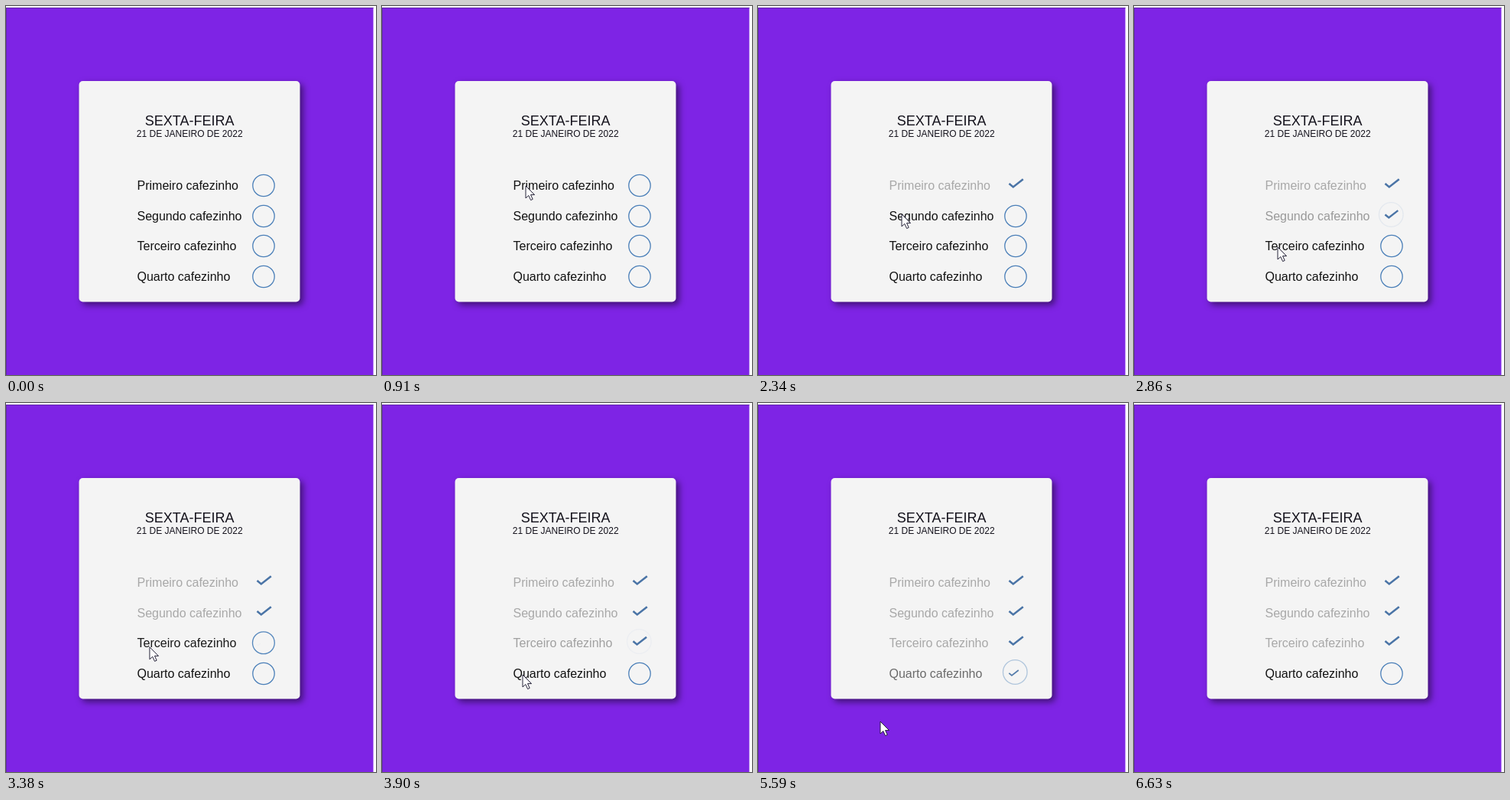
An HTML page for the animation above (6.76 s loop, 484 by 482 pixels).

```html
<!DOCTYPE html>
<html lang="pt-BR">
<head>
<meta charset="utf-8">
<title>Cafezinhos</title>
<style>
  html, body { margin: 0; width: 100%; height: 100%; overflow: hidden; background: #fff; }
  svg { display: block; width: 100vw; height: 100vh; }
  text { font-family: "Liberation Sans", Arial, sans-serif; fill: #14121c; }
  .card { fill: #f4f4f4; filter: drop-shadow(4px 4px 4px rgba(0, 0, 0, .5)); }
  .ring { fill: none; stroke: #4a7fb8; stroke-width: 1.3; }
  .tick { fill: none; stroke: #4a74a6; stroke-width: 2.6; }
</style>
</head>
<body>
<svg viewBox="0 0 484 482">
  <rect y="2" width="480.5" height="480" fill="#7e24e5"/>
  <path d="M.5 482V2.5H480.5" fill="none" stroke="#5f2aa8"/>
  <rect class="card" x="95.5" y="98" width="289" height="288.5" rx="5"/>
  <text x="240.2" y="156" font-size="18" text-anchor="middle">SEXTA-FEIRA</text>
  <text x="240.2" y="171" font-size="12" text-anchor="middle">21 DE JANEIRO DE 2022</text>
  <g id="list"></g>
  <path id="cursor" d="M0 0V16L3.8 12.5 6.6 18.6 9.2 17.4 6.5 11.6H11.6Z"
        fill="#fff" stroke="#26243a" stroke-linejoin="round"/>
</svg>
<script>
const LOOP = 6760, STEP = 130, FADE = 800;
const NS = "http://www.w3.org/2000/svg";
const list = document.getElementById("list");
const cursor = document.getElementById("cursor");

// on / off: when the item is ticked and unticked
const items = [
  { label: "Primeiro cafezinho", y: 234.5, on: 1290 },
  { label: "Segundo cafezinho", y: 274.5, on: 2360 },
  { label: "Terceiro cafezinho", y: 313.5, on: 3325 },
  { label: "Quarto cafezinho", y: 353.5, on: 4350, off: 5390 }
];

// time, x, y of the pointer tip
const path = [
  [390, 40, 470], [520, 88, 415], [780, 186, 238], [910, 188, 235],
  [1300, 188, 235], [1690, 188, 265], [2360, 188, 272], [2860, 188, 315],
  [3330, 188, 318], [3900, 184, 355], [5350, 184, 357], [5590, 160, 416],
  [5850, 120, 490]
];

function add(tag, attrs) {
  const el = document.createElementNS(NS, tag);
  set(el, attrs);
  return list.appendChild(el);
}

function set(el, attrs) {
  for (const key in attrs) el.setAttribute(key, attrs[key]);
}

const clamp = v => Math.min(1, Math.max(0, v));
const mix = (a, b, k) => a + (b - a) * k;

// cubic-bezier(.25, .1, .25, 1)
function ease(x) {
  if (x <= 0 || x >= 1) return clamp(x);
  const curve = (a, b, u) => 3 * a * u * (1 - u) ** 2 + 3 * b * u * u * (1 - u) + u ** 3;
  let lo = 0, hi = 1;
  for (let i = 0; i < 20; i++) {
    const mid = (lo + hi) / 2;
    if (curve(.25, .25, mid) < x) lo = mid; else hi = mid;
  }
  return curve(.1, 1, lo);
}

for (const item of items) {
  item.text = add("text", { x: 171.5, y: item.y + 5.5, "font-size": 16 });
  item.text.textContent = item.label;
  item.ring = add("circle", { class: "ring" });
  item.tick = add("path", { class: "tick", d: "M.5 -6L5.8 -1.6 18.8 -11.8" });
}

function drawItem(item, t) {
  const p = item.off && t >= item.off
    ? 1 - ease((t - item.off) / FADE)
    : ease((t - item.on) / FADE);
  const grow = clamp(p * 2.5);
  const shade = Math.round(mix(18, 168, p));
  item.text.style.fill = `rgb(${shade},${shade},${shade})`;
  set(item.ring, {
    cx: mix(337, 336.3, grow), cy: item.y - 2 * grow,
    r: mix(14.2, 15.8, grow), opacity: 1 - p
  });
  set(item.tick, {
    transform: `translate(328 ${item.y + 3.5}) scale(${mix(.22, 1, p)})`,
    opacity: clamp(p * 1.6)
  });
}

function drawCursor(t) {
  const i = path.findIndex(point => point[0] > t);
  const shown = i > 0;
  cursor.style.display = shown ? "" : "none";
  if (!shown) return;
  const [t0, x0, y0] = path[i - 1], [t1, x1, y1] = path[i];
  const k = (t - t0) / (t1 - t0), s = k * k * (3 - 2 * k);
  set(cursor, { transform: `translate(${mix(x0, x1, s)} ${mix(y0, y1, s)})` });
}

function draw(now) {
  const t = Math.floor((now % LOOP) / STEP) * STEP;
  items.forEach(item => drawItem(item, t));
  drawCursor(t);
}

const start = performance.now();
function tick() {
  draw(performance.now() - start);
  requestAnimationFrame(tick);
}
tick();
</script>
</body>
</html>
```
